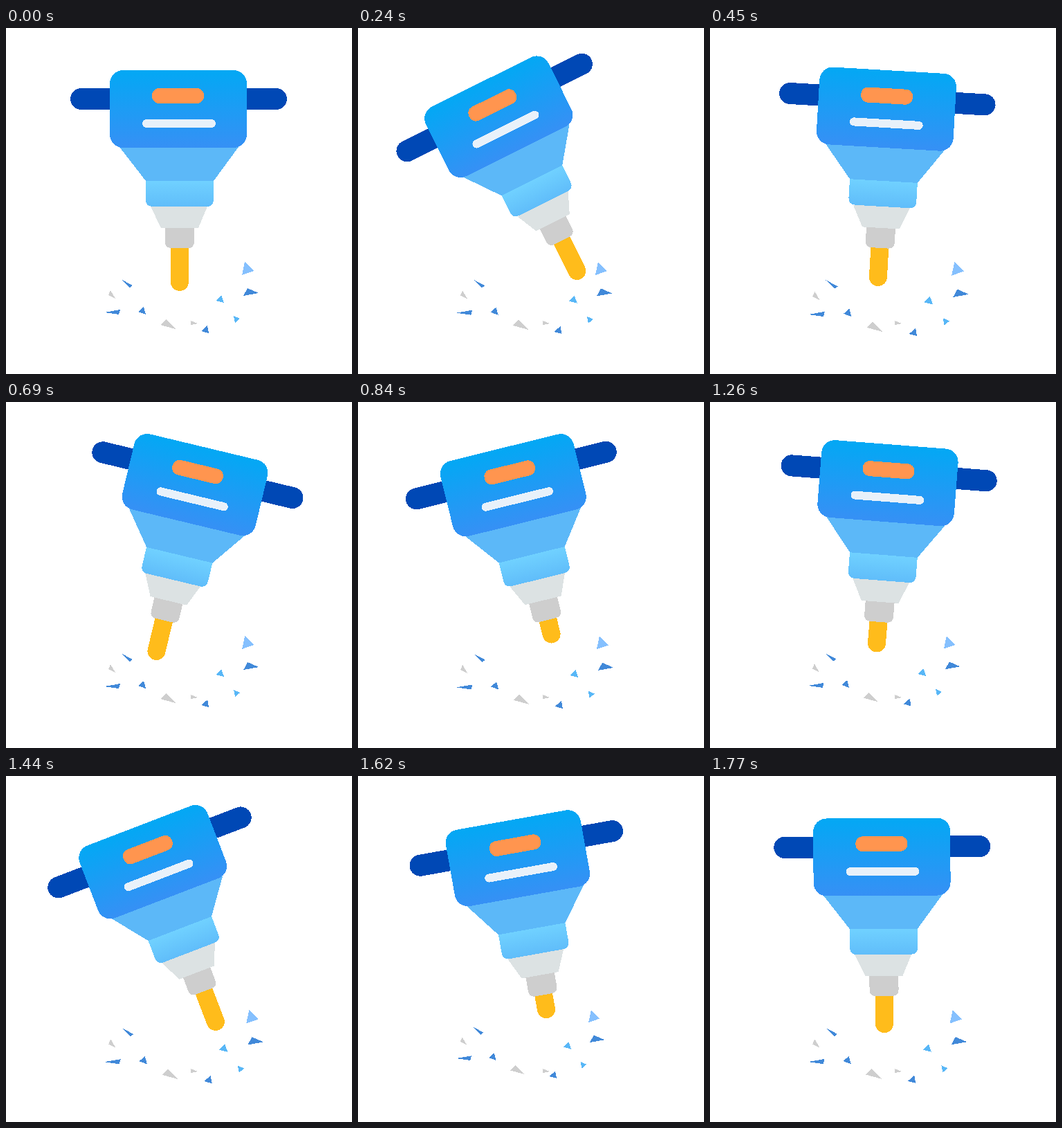
Animation, 500 px wide and 500 px high, one loop 1800 ms. Source, as an HTML page:

```html
<!DOCTYPE html>
<html lang="en">
<head>
<meta charset="utf-8">
<title>Jackhammer</title>
<style>
  html, body { margin: 0; width: 100%; height: 100%; overflow: hidden; background: #fff; }
  svg { display: block; width: 100vw; height: 100vh; shape-rendering: crispEdges; }
</style>
</head>
<body>
<svg viewBox="0 0 500 500">
  <defs>
    <linearGradient id="shell" x2="0" y2="1">
      <stop stop-color="#03a8f4"/>
      <stop offset="1" stop-color="#3690f5"/>
    </linearGradient>
    <linearGradient id="neck" x2="0" y2="1">
      <stop stop-color="#70d1ff"/>
      <stop offset="1" stop-color="#60bdfa"/>
    </linearGradient>
  </defs>
  <path fill="#cecece" d="M267 423L277 427L267 429Z"/>
  <g id="chips">
    <g fill="#4189d9">
      <path d="M349 376L365 383L343 387Z"/>
      <path d="M291 430L293 441L282 438Z"/>
      <path d="M199 403L202 414L191 410Z"/>
      <path d="M165 407L163 414L142 411Z"/>
      <path d="M166 363L183 372L179 375Z"/>
    </g>
    <g fill="#cecece">
      <path d="M231 421L245 435L223 429Z"/>
      <path d="M151 379L158 391L148 386Z"/>
    </g>
    <path fill="#85c0fe" d="M345 338L358 351L341 357Z"/>
    <path fill="#58b7f7" d="M311 386L315 397L303 394ZM329 416L338 420L331 426Z"/>
  </g>
  <g id="drill">
    <rect id="bit" x="238" y="280" width="26" height="100" rx="13" fill="#ffbc1b"/>
    <path fill="#cecece" d="M230 289H272V309Q272 318 263 318H239Q230 318 230 309Z"/>
    <path fill="#dce2e3" d="M209 258H291L278 289H224Z"/>
    <path fill="#5cb8f8" d="M164 172H336L300 221H202Z"/>
    <path fill="url(#neck)" d="M202 221H300V248Q300 258 290 258H212Q202 258 202 248Z"/>
    <rect x="93" y="87" width="313" height="31" rx="15.5" fill="#0048b5"/>
    <rect x="150" y="61" width="198" height="112" rx="19" fill="url(#shell)"/>
    <rect x="211" y="87" width="75" height="22" rx="10" fill="#ff954f"/>
    <rect x="197" y="132" width="106" height="12" rx="6" fill="#e8f1fa"/>
  </g>
</svg>
<script>
  const LOOP = 1800, STEP = 30;
  const [drill, bit, chips] = ["drill", "bit", "chips"].map(id => document.getElementById(id));
  const sin = cycles => Math.sin(cycles * 2 * Math.PI);
  const cos = cycles => Math.cos(cycles * 2 * Math.PI);

  // Turning points of the swing: [ms, degrees]
  const swing = [[0, 0], [309, -30], [568, 28.5], [874, -15.2], [1165, 14.4], [1432, -21], [LOOP, 0]];

  function angle(t) {
    const i = swing.findIndex(key => key[0] > t);
    const [t0, a] = swing[i - 1], [t1, b] = swing[i];
    return a + (b - a) * (1 - cos((t - t0) / (t1 - t0) / 2)) / 2;
  }

  // The bit hammers steadily, with a short rush past mid-loop.
  function lift(u) {
    const rush = 0.25 * Math.exp(-(((u - 0.58) / 0.2) ** 2));
    return 15 * (1 - cos(7.3 * u + rush));
  }

  // Six pulses per loop, quicker at first and slower later.
  function spread(u) {
    const drift = 0.2 * sin(u) + 0.04 * (1 - cos(u));
    return 1 - 0.041 * sin(6 * u + drift);
  }

  function draw(now) {
    const t = Math.floor((now % LOOP) / STEP) * STEP, u = t / LOOP;
    drill.setAttribute("transform", `rotate(${angle(t)} 250 220)`);
    bit.setAttribute("transform", `translate(0 ${-lift(u)})`);
    chips.setAttribute("transform", `translate(142 338) scale(${spread(u)}) translate(-142 -338)`);
  }

  const start = performance.now();
  function tick() {
    draw(performance.now() - start);
    requestAnimationFrame(tick);
  }
  tick();
</script>
</body>
</html>
```
